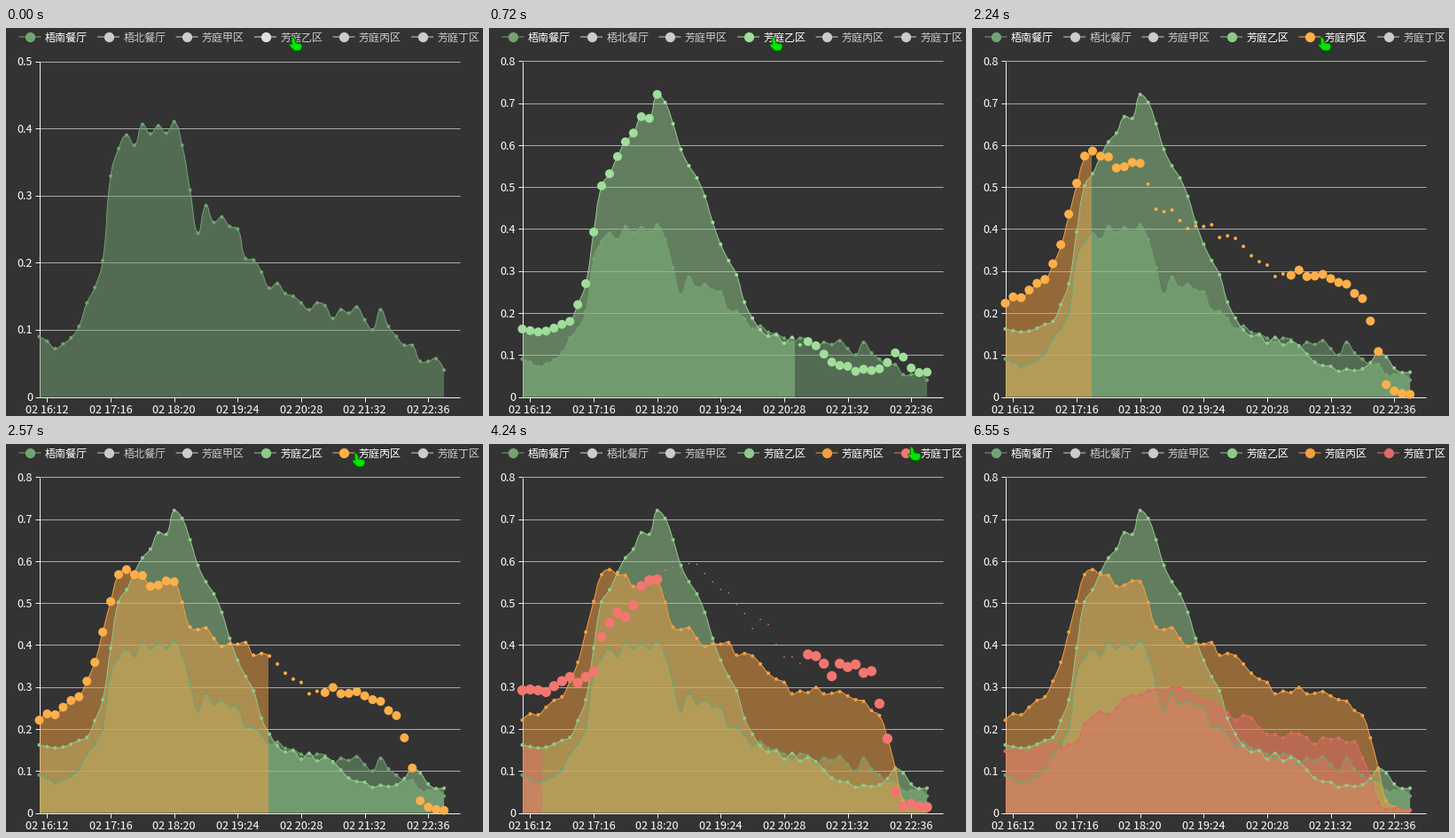
Recreate the animation shown at these times as a matplotlib script. Size 538x437 px, loop 7.35 s.

```python
import numpy as np
import matplotlib.pyplot as plt
from matplotlib.animation import FuncAnimation
from matplotlib.colors import to_rgb
from matplotlib.patches import PathPatch, Polygon, Rectangle
from matplotlib.path import Path

W, H, DPI = 538, 437, 64
PT = 72 / DPI  # points per pixel
LOOP, INTERVAL = 7350, 30
LEFT, RIGHT, TOP, BOTTOM = 37.5, 512, 37.5, 415.5
FONT = "Noto Sans CJK JP"
AXIS, GRID, OFF = "#eeeeee", "#aaaaaa", "#cccccc"
X = LEFT + (RIGHT - LEFT) / 53 * np.arange(52)
FINAL_SCALE = 1 / 0.8
FIRST_CLICK = 72
# Points that grow to normal size instead of the hover size
PLAIN = (np.arange(52) >= 18) & (np.arange(52) <= 35)

# (first, last, count) of each run of picture updates
BURSTS = [(0, 0, 1), (90, 810, 9), (900, 1080, 3), (1440, 1800, 5),
          (2060, 2570, 7), (2660, 2730, 2), (2820, 3000, 3), (3550, 4080, 7),
          (4240, 4960, 9), (5050, 5140, 2), (6290, 6550, 4)]
TICKS = np.concatenate([np.linspace(*b) for b in BURSTS])

CURSOR_T = [0, 90, 1350, 1440, 1530, 1620, 1800, 3460, 3550, 3640, 3730, 3900, 4080, 6200, 6290]
CURSOR_X = [322, 319, 319, 331, 362, 388, 393, 393, 400, 425, 458, 473, 475, 475, 511]
CURSOR_Y = [10, 10, 10, 10, 10, 10, 10, 10, 10, 9, 6, 4, 3, 3, 11]
CURSOR_GONE = 6380


def cubic_out(k):
    return 1 - (1 - np.clip(k, 0, 1)) ** 3


def elastic_out(k):
    if k <= 0 or k >= 1:
        return float(k >= 1)
    return 1 + 2 ** (-10 * k) * np.sin((k - 0.1) * 2 * np.pi / 0.4)


def lerp(a, b, k):
    return a + (b - a) * k


def lift(color):
    return tuple(min(1, 1.1 * c) for c in to_rgb(color))


def to_y(value, scale):
    return BOTTOM - (BOTTOM - TOP) * np.asarray(value) * scale


def smooth_path(y, closed=False):
    p = np.column_stack([X, y])
    prev, nxt = np.vstack([p[:1], p[:-1]]), np.vstack([p[1:], p[-1:]])
    v = nxt - prev
    before = np.linalg.norm(p - prev, axis=1)
    after = np.linalg.norm(nxt - p, axis=1)
    ratio = (after / (before + after))[:, None]
    lo, hi = p.min(axis=0), p.max(axis=0)
    c_in = np.clip(p - 0.5 * v * (1 - ratio), lo, hi)
    c_out = np.clip(p + 0.5 * v * ratio, lo, hi)
    c_out[0], c_in[-1] = p[0], p[-1]
    curve = np.stack([c_out[:-1], c_in[1:], p[1:]], axis=1).reshape(-1, 2)
    verts = np.vstack([p[:1], curve])
    codes = [Path.MOVETO] + [Path.CURVE4] * len(curve)
    if closed:
        verts = np.vstack([verts, [X[-1], BOTTOM], [X[0], BOTTOM], p[:1]])
        codes += [Path.LINETO, Path.LINETO, Path.CLOSEPOLY]
    return Path(verts, codes)


fig = plt.figure(figsize=(W / DPI, H / DPI), dpi=DPI, facecolor="#333333")
ax = fig.add_axes([0, 0, 1, 1])
ax.set(xlim=(0, W), ylim=(H, 0))
ax.axis("off")


def stroke(xs, ys, color, z=1, **kw):
    return ax.plot(xs, ys, color=color, lw=PT, zorder=z, solid_capstyle="butt", **kw)[0]


def label(x, y, text, size=12.0, ha="left"):
    return ax.text(x, y, text, color="white", size=size * PT, family=FONT,
                   ha=ha, va="baseline", zorder=6)


class Series:
    """Smoothed area line; `own_max` is the axis maximum it is rescaled from."""

    def __init__(self, color, thousandths, own_max, click, leave, order):
        self.color, self.click, self.leave = color, click, leave
        self.values = np.array(thousandths) / 1000
        self.start_scale = 1 / own_max
        self.initial = click < 0
        self.area = ax.add_patch(PathPatch(smooth_path(X), fc=color, alpha=0.5, lw=0,
                                           zorder=2 + order / 10))
        self.line = ax.add_patch(PathPatch(smooth_path(X), fc="none", ec=color, lw=PT,
                                           zorder=3 + order / 10))
        self.dots = ax.scatter(X, X, linewidths=0, zorder=4 + order / 10)

    def radii(self, t):
        if t >= self.leave:
            return np.where(PLAIN, 2, 5 - 3 * elastic_out((t - self.leave) / 400))
        age = t - self.click
        return np.where(PLAIN, 2 * cubic_out(age / 300), 5 * elastic_out(age / 400))

    def update(self, t):
        shown = t >= self.click
        for artist in (self.area, self.line, self.dots):
            artist.set_visible(shown)
        if not shown:
            return
        since = FIRST_CLICK if self.initial else self.click
        scale = lerp(self.start_scale, FINAL_SCALE, cubic_out((t - since) / 300))
        y = to_y(self.values, scale if self.initial else FINAL_SCALE)
        self.area.set_path(smooth_path(y, closed=True))
        self.line.set_path(smooth_path(y))
        width = (RIGHT - LEFT) * min(1, (t - self.click) / 1000)
        window = Rectangle((LEFT, 0), width, H, transform=ax.transData)
        self.area.set_clip_path(window)
        self.line.set_clip_path(window)
        self.dots.set_offsets(np.column_stack([X, to_y(self.values, scale)]))
        self.dots.set_sizes((2 * PT * self.radii(t)) ** 2)
        self.dots.set_facecolor(lift(self.color) if t < self.leave else self.color)


hall = Series("#73a373", [
    90, 83, 72, 79, 88, 105, 140, 163, 203, 329, 370, 390, 375, 406, 392, 404, 393, 410,
    375, 308, 244, 285, 260, 268, 254, 250, 206, 204, 186, 162, 169, 154, 150, 140, 130,
    140, 136, 117, 130, 125, 134, 115, 100, 130, 105, 90, 77, 77, 53, 53, 57, 40],
    0.5, -9999, -9999, 0)
second = Series("#91ca8c", [
    162, 158, 155, 157, 164, 173, 180, 220, 270, 393, 503, 532, 573, 608, 629, 668, 664, 721,
    702, 651, 590, 551, 522, 478, 416, 364, 325, 291, 226, 188, 160, 145, 148, 128, 142,
    124, 132, 122, 102, 83, 75, 73, 61, 66, 63, 67, 82, 105, 95, 69, 58, 59],
    0.8, FIRST_CLICK, 1528, 1)
third = Series("#f49f42", [
    221, 236, 234, 252, 268, 277, 314, 359, 431, 504, 568, 580, 568, 566, 540, 543, 553, 551,
    502, 443, 437, 441, 416, 397, 403, 402, 406, 376, 380, 374, 355, 333, 319, 311, 284,
    290, 287, 299, 284, 285, 289, 279, 270, 266, 244, 232, 179, 107, 29, 14, 8, 6],
    0.6, 2025, 3660, 2)
fourth = Series("#dd6b66", [
    147, 148, 147, 145, 152, 158, 163, 156, 163, 169, 211, 228, 240, 235, 249, 272, 279, 280,
    291, 294, 288, 299, 298, 287, 277, 268, 264, 250, 239, 221, 232, 226, 202, 187, 187,
    179, 190, 188, 179, 164, 179, 175, 178, 168, 170, 131, 89, 25, 8, 11, 8, 7],
    0.3, 4192, 6270, 3)
all_series = [hall, second, third, fourth]

# Axes
levels = []
for i in range(9):
    rule = stroke([LEFT, RIGHT], [0, 0], GRID if i else AXIS, 1 if i else 1.5)
    tick = stroke([LEFT - 5, LEFT], [0, 0], AXIS)
    levels.append((i / 10, rule, tick, label(30, 0, f"{i / 10:g}", 12.7, "right")))
stroke([LEFT, LEFT], [TOP, BOTTOM], AXIS, 1.5)
for i in range(7):
    x = X[1 + 8 * i]
    minutes = 16 * 60 + 12 + 64 * i
    stroke([x, x], [BOTTOM, BOTTOM + 5], AXIS)
    label(x, 434.5, f"02 {minutes // 60}:{minutes % 60:02d}", 12.7, "center")

# Legend
NAMES = ["梧南餐厅", "梧北餐厅", "芳庭甲区", "芳庭乙区", "芳庭丙区", "芳庭丁区"]
OWNERS = [hall, None, None, second, third, fourth]
legend = []
for i, (name, owner) in enumerate(zip(NAMES, OWNERS)):
    x = 27 + 88.5 * i
    bar = stroke([x - 12.5, x + 12.5], [10, 10], OFF, 5, snap=False)
    disc = ax.scatter([x], [10], s=(11.2 * PT) ** 2, linewidths=0, zorder=5.5)
    legend.append((x, owner, bar, disc, label(x + 17, 14.5, name)))

# Hand pointer
HAND = np.array([(0, 0.5), (1.2, 0), (2.6, 0.5), (4, 3), (4.6, 6.5), (11, 8), (12, 10),
                 (11.5, 13), (9.5, 15.5), (3, 15.5), (-1.5, 11), (-2.5, 8.5), (-0.8, 7.8),
                 (0.4, 8.8)])
CUFF = np.array([(2.6, 15.8), (9.8, 15.8), (9.4, 18.5), (3, 18.5)])
hand = ax.add_patch(Polygon(HAND, fc="#00e600", ec="#0a5a0a", lw=0.8 * PT, zorder=10))
cuff = ax.add_patch(Polygon(CUFF, fc="#064d06", lw=0, zorder=9))


def draw(frame):
    now = frame * INTERVAL + 20
    t = TICKS[TICKS <= now][-1]

    scale = lerp(hall.start_scale, FINAL_SCALE, cubic_out((t - FIRST_CLICK) / 300))
    for value, rule, tick, text in levels:
        added = value > 0.5
        y = float(to_y(value, FINAL_SCALE if added else scale))
        rule.set_ydata([y, y])
        tick.set_ydata([y, y])
        text.set_y(y + 4.6)
        for artist in (rule, tick, text):
            artist.set_visible(not added or t >= FIRST_CLICK)

    for series in all_series:
        series.update(t)

    tip = np.array([np.interp(t, CURSOR_T, CURSOR_X), np.interp(t, CURSOR_T, CURSOR_Y)])
    hand.set_xy(HAND + tip)
    cuff.set_xy(CUFF + tip)
    for part in (hand, cuff):
        part.set_visible(t < CURSOR_GONE)

    for x, owner, bar, disc, text in legend:
        active = owner is not None and t >= owner.click
        color = owner.color if active else OFF
        hovered = t < 6270 and x - 12 <= tip[0] <= x + 66
        bar.set_color(lift(color) if hovered else color)
        disc.set_facecolor(lift(color) if hovered else color)
        text.set_color("white" if active else OFF)
    return []


anim = FuncAnimation(fig, draw, frames=LOOP // INTERVAL, interval=INTERVAL,
                     init_func=lambda: draw(0), repeat=True, repeat_delay=0)
plt.show()
```
